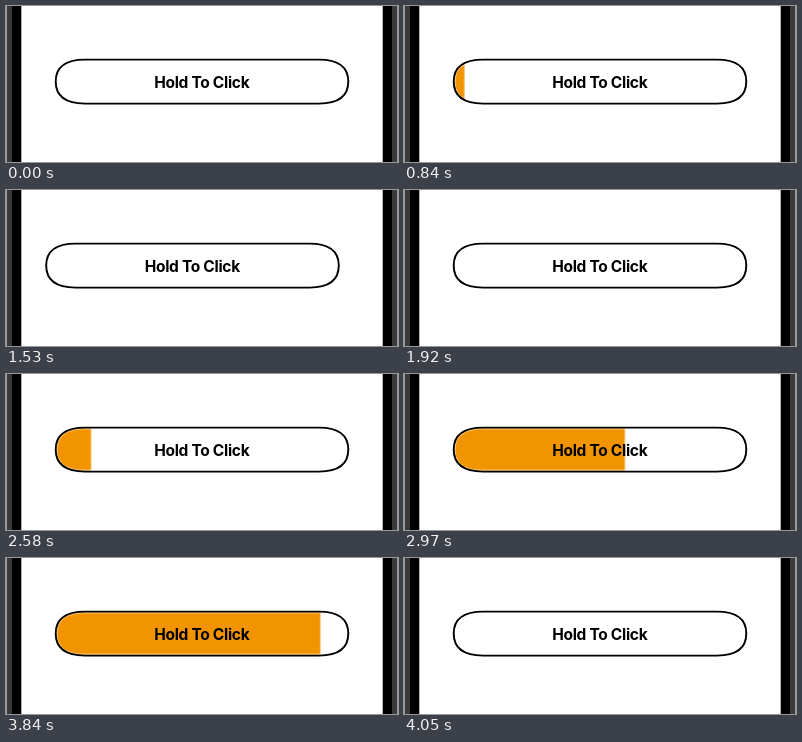
An HTML page that plays this animation: 392x156 px, repeating every 4500 ms.

```html
<!DOCTYPE html>
<html lang="en">
<head>
<meta charset="utf-8">
<title>Hold button</title>
<style>
  html, body { margin: 0; width: 100%; height: 100%; overflow: hidden; background: #fff; }
  svg { display: block; width: 392px; height: 156px; }
  text {
    font: 700 15.5px Inter, "Liberation Sans", sans-serif;
    letter-spacing: -.3px;
    text-anchor: middle;
  }
  .outline { fill: none; stroke: #000; stroke-width: 1.9; }
  .rim { fill: none; stroke: #fff; stroke-width: 4; opacity: .45; }
  .fill {
    fill: #f29400;
    stroke: #ffd9a0;
    vector-effect: non-scaling-stroke;
    transform-origin: 50px 0;
    animation: hold 4500ms linear infinite;
  }
  .button { animation: nudge 4500ms linear infinite; }

  /* A short press that is let go, then a full press that completes. */
  @keyframes hold {
    0% { transform: scaleX(0); }
    14.889% { transform: scaleX(0); animation-timing-function: cubic-bezier(.42, 0, .711, .476); }
    27.711% { transform: scaleX(.4238); animation-timing-function: ease-in-out; }
    33.333% { transform: scaleX(0); }
    50.533% { transform: scaleX(0); animation-timing-function: cubic-bezier(.41, 0, .54, 1); }
    79.8% { transform: scaleX(1); }
    84.111% { transform: scaleX(1); animation-timing-function: ease-in-out; }
    89.822%, 100% { transform: scaleX(0); }
  }
  @keyframes nudge {
    0% { transform: translateX(0); }
    27.778% { transform: translateX(0); animation-timing-function: ease-in-out; }
    34.889% { transform: translateX(-9.8px); animation-timing-function: cubic-bezier(.42, 0, .4, 1); }
    42.889%, 100% { transform: translateX(0); }
  }
</style>
</head>
<body>
<svg viewBox="0 0 392 156">
  <defs>
    <path id="shape" d="M79 53.6H313C335.6 53.6 342.3 62.8 342.3 75.6S335.6 97.6 313 97.6H79C56.4 97.6 49.7 88.4 49.7 75.6S56.4 53.6 79 53.6Z"/>
    <clipPath id="clip"><use href="#shape"/></clipPath>
    <g id="bezel">
      <rect width="15.3" height="156"/>
      <rect width="6" height="156" fill="#3a3a3a"/>
      <rect width="1" height="156" fill="#999"/>
    </g>
  </defs>
  <use href="#bezel"/>
  <use href="#bezel" transform="matrix(-1 0 0 1 392 0)"/>
  <g class="button">
    <g clip-path="url(#clip)">
      <rect class="fill" x="50" y="53" width="293" height="46"/>
      <use href="#shape" class="rim"/>
    </g>
    <use href="#shape" class="outline"/>
    <text x="195.8" y="81.7">Hold To Click</text>
  </g>
</svg>
</body>
</html>
```
